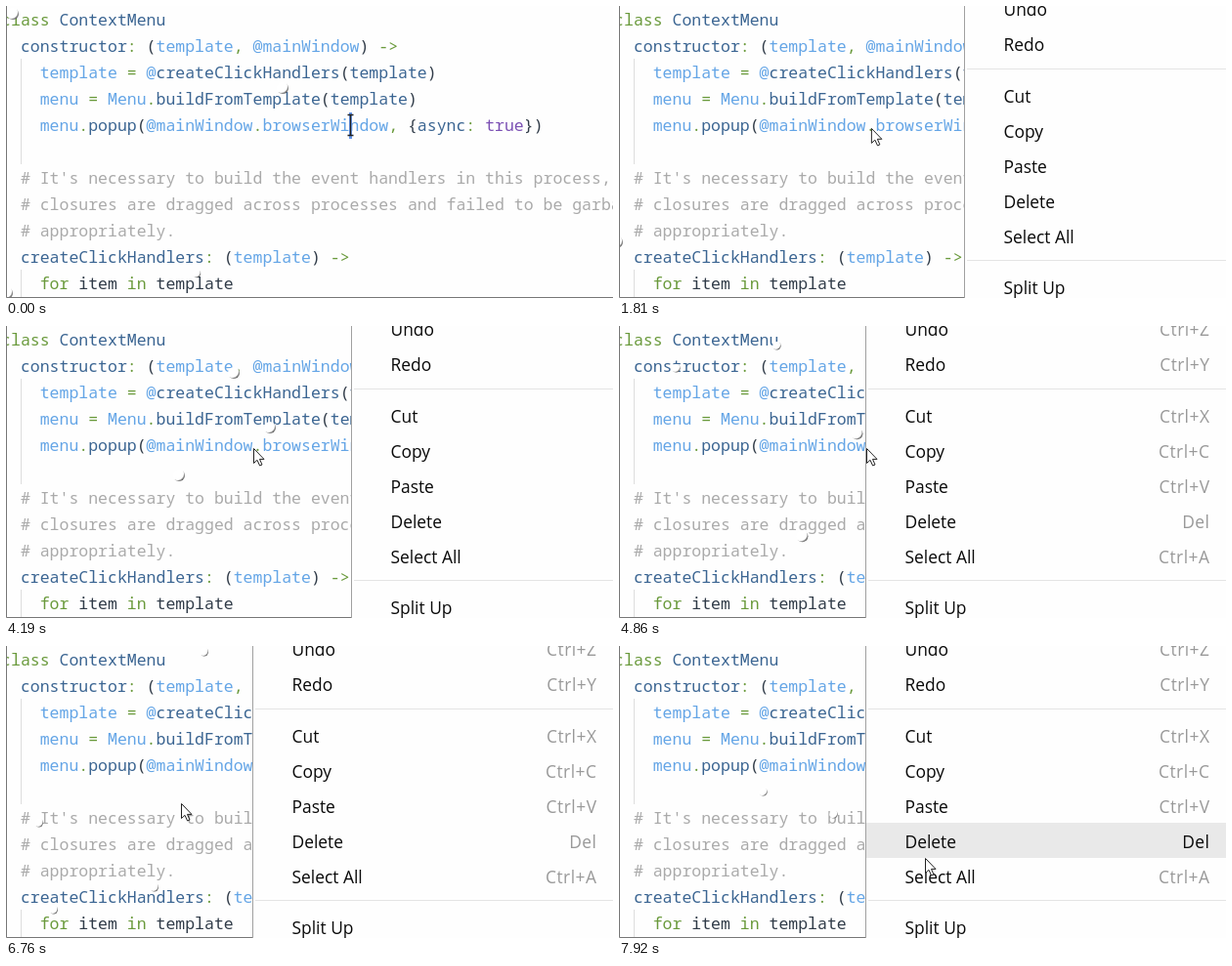
Write an HTML page that moves like this. It is 621 px wide and 299 px high and loops after 8000 ms.

```html
<!DOCTYPE html>
<html lang="en">
<head>
<meta charset="utf-8">
<title>Context menu in a code editor</title>
<style>
  html, body { margin: 0; width: 100%; height: 100%; overflow: hidden; background: #fff; }
  svg { display: block; width: 621px; height: 299px; }
  text { white-space: pre; }
  #code { font: 16.5px "Noto Sans Mono", monospace; font-variant-ligatures: none; }
  #menu { font: 17.4px "Open Sans", sans-serif; fill: #0a0a0a; }
  #menu .key { fill: #999; text-anchor: end; letter-spacing: .5px; }
  #menu .key.hover { fill: #0a0a0a; }
</style>
</head>
<body>
<svg viewBox="0 0 621 299">
  <defs>
    <radialGradient id="snow" cx=".36" cy=".36" r=".7">
      <stop offset=".73" stop-color="#fff"/>
      <stop offset=".87" stop-color="#8a8a8a"/>
      <stop offset="1" stop-color="#505050"/>
    </radialGradient>
  </defs>
  <rect width="621" height="299" fill="#fefefe"/>
  <path d="M15.5 54V162M15.5 270V298" stroke="#dedede"/>
  <g id="code"></g>
  <rect id="caret" x="351" y="109" width="3" height="27" fill="#6597ea"/>
  <g id="flakes" fill="url(#snow)"></g>
  <path d="M.5 0V298.5H621" fill="none" stroke="#777"/>
  <g id="menu">
    <rect width="640" height="299" fill="#fefefe"/>
    <path d="M.5 0V299" stroke="#a0a0a0"/>
    <rect id="highlight" x="1" y="181" width="640" height="36" fill="#e9e9e9"/>
  </g>
  <path id="beam" d="M-3 -10.5H3M0 -10.5V10.5M-3 10.5H3" stroke="#222" stroke-width="1.3"
        transform="translate(352.5 122)"/>
  <path id="arrow" d="M.5 .5V15.5L4 12.3L6.6 18L9 17L6.5 11.4H11Z" fill="#fff" stroke="#222"/>
</svg>
<script>
const LOOP = 8000, MENU_OPENS = 650, MENU_MOVES = 4640;
const ROW = 36, GROUP_GAP = 16.5, HOVER_TOP = 181;
const $ = id => document.getElementById(id);

function add(parent, tag, attrs, text) {
  const el = document.createElementNS('http://www.w3.org/2000/svg', tag);
  for (const name in attrs) el.setAttribute(name, attrs[name]);
  if (text) el.textContent = text;
  return parent.appendChild(el);
}

// Each line alternates colour key and text.
const colors = { g: '#6a9a3c', n: '#3b6592', b: '#64a5e6', d: '#303b48', p: '#7b50b4', c: '#aaa' };
const lines = [
  ['g', 'class ', 'n', 'ContextMenu'],
  ['n', '  constructor', 'g', ':', 'd', ' (', 'b', 'template', 'g', ', ', 'b', '@mainWindow', 'd', ')', 'g', ' ->'],
  ['b', '    template', 'g', ' = ', 'b', '@', 'n', 'createClickHandlers', 'd', '(', 'n', 'template', 'd', ')'],
  ['b', '    menu', 'g', ' = ', 'b', 'Menu', 'g', '.', 'n', 'buildFromTemplate', 'd', '(', 'n', 'template', 'd', ')'],
  ['b', '    menu', 'g', '.', 'n', 'popup', 'd', '(', 'b', '@mainWindow', 'g', '.', 'b', 'browserWindow',
    'g', ', ', 'd', '{', 'n', 'async', 'g', ': ', 'p', 'true', 'd', '})'],
  [],
  ['c', "  # It's necessary to build the event handlers in this process, otherwise"],
  ['c', '  # closures are dragged across processes and failed to be garbage collected'],
  ['c', '  # appropriately.'],
  ['n', '  createClickHandlers', 'g', ':', 'd', ' (', 'b', 'template', 'd', ')', 'g', ' ->'],
  ['g', '    for ', 'd', 'item', 'g', ' in ', 'd', 'template']
];
lines.forEach((line, row) => {
  const text = add($('code'), 'text', { x: -4.9, y: 20 + row * 27 });
  for (let i = 0; i < line.length; i += 2) add(text, 'tspan', { fill: colors[line[i]] }, line[i + 1]);
});

const groups = [
  { Undo: 'Ctrl+Z', Redo: 'Ctrl+Y' },
  { Cut: 'Ctrl+X', Copy: 'Ctrl+C', Paste: 'Ctrl+V', Delete: 'Del', 'Select All': 'Ctrl+A' },
  { 'Split Up': '' }
];
const keys = {};
let baseline = 10.25;
groups.forEach((group, i) => {
  if (i) {
    const y = Math.floor(baseline - ROW / 2) + 0.5;
    add($('menu'), 'path', { d: `M3 ${y}H640`, stroke: '#e4e4e4' });
    baseline += GROUP_GAP;
  }
  for (const label in group) {
    const y = Math.round(baseline);
    add($('menu'), 'text', { x: 40.5, y }, label);
    keys[label] = add($('menu'), 'text', { x: 352.5, y, class: 'key' }, group[label]);
    baseline += ROW;
  }
});

// Snow: all flakes share one fall and sway; each has its own column and head start.
const flake = (r, x, delay) => ({ x, delay, dot: add($('flakes'), 'circle', { r }) });
const flakes = [
  ...[[283, -72], [1, -282], [7, 4], [186, 312], [279, 361], [242, 417]].map(p => flake(6, ...p)),
  ...[[195, -262], [57, 484], [160, 507], [42, 573], [211, 748], [139, 771]].map(p => flake(4.2, ...p))
];
const fall = s => 115 * s - 38 * Math.sin(Math.PI * (s - 3.6) / 4);
const sway = s => 9 * Math.sin(2 * Math.PI * s / 2.4);

function ease(t, from, to) {
  const u = Math.min(1, Math.max(0, (t - from) / (to - from)));
  return u * u * (3 - 2 * u);
}

function mouse(t) {
  const back = ease(t, 1230, 1900), rest = ease(t, 5640, 6600), pick = ease(t, 6850, 7900);
  return [354 - 101 * back - 74 * rest + 134 * pick, 123 + 2 * back + 36 * rest + 56 * pick];
}

const show = (el, on) => el.setAttribute('visibility', on ? 'visible' : 'hidden');
const place = (el, x, y) => el.setAttribute('transform', `translate(${x} ${y})`);

function draw(t) {
  const open = t >= MENU_OPENS, left = t < MENU_MOVES ? 353 : 252;
  const [x, y] = mouse(t);
  const hover = x > left && y >= HOVER_TOP && y <= HOVER_TOP + ROW;

  $('menu').setAttribute('display', open ? 'inline' : 'none');
  place($('menu'), left, 0);
  $('highlight').setAttribute('display', hover ? 'inline' : 'none');
  keys.Delete.classList.toggle('hover', hover);

  show($('caret'), t < MENU_MOVES && (t / 800 + 0.45) % 1 < 0.5);
  show($('beam'), !open);
  show($('arrow'), open);
  place($('arrow'), x, y);

  const s = t / 1000;
  for (const { x, delay, dot } of flakes) place(dot, x + sway(s), fall(s) - delay);
}

const start = performance.now();
function tick() {
  draw((performance.now() - start) % LOOP);
  requestAnimationFrame(tick);
}
tick();
</script>
</body>
</html>
```
